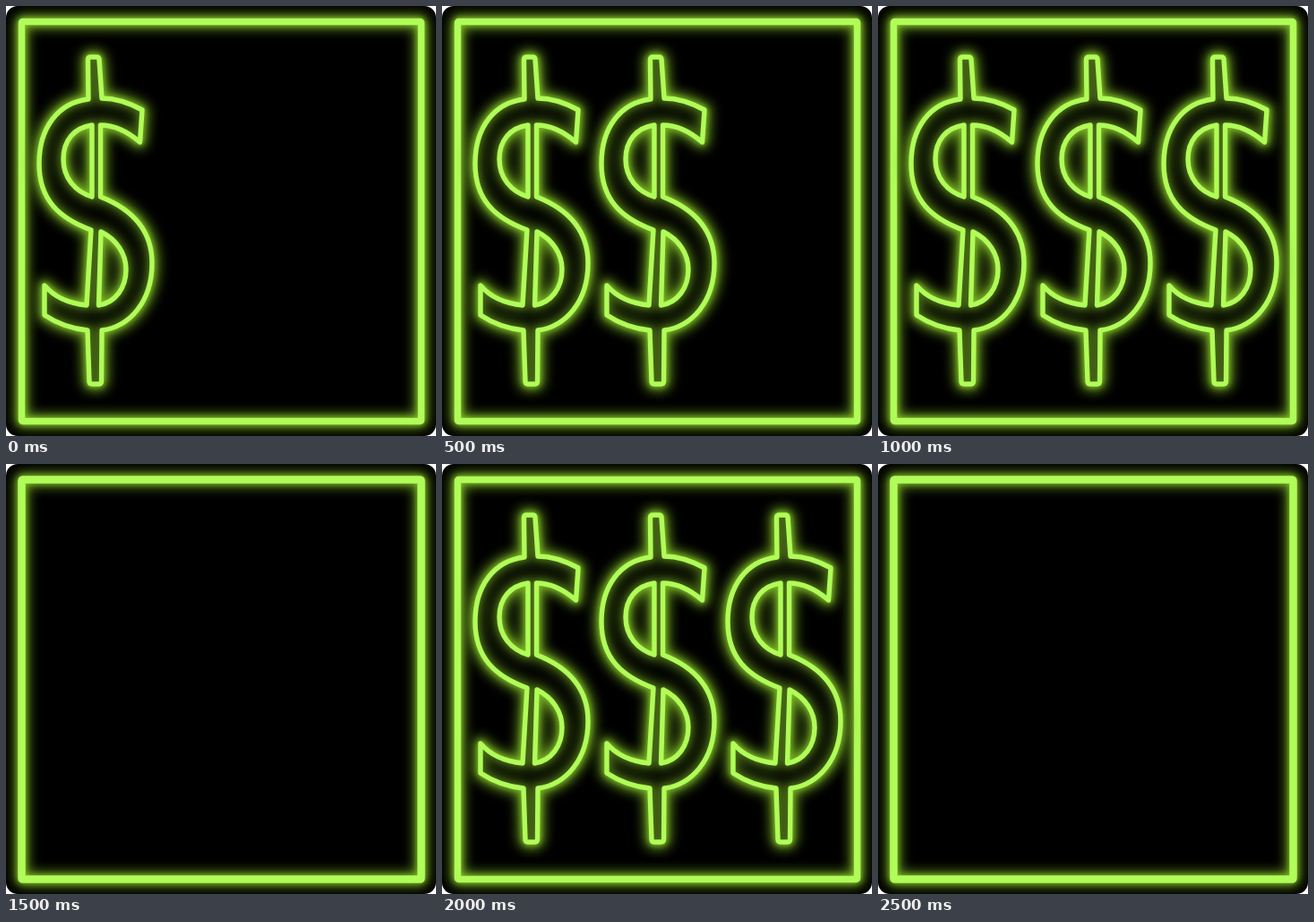
An HTML page for the animation above (3 s loop, 480 px wide and 480 px high).

```html
<!DOCTYPE html>
<html lang="en">
<head>
<meta charset="utf-8">
<title>Neon dollars</title>
<style>
  html, body { margin: 0; width: 100%; height: 100%; overflow: hidden; background: #fff; }
  svg { display: block; width: 100vw; height: 100vh; }
  .neon { fill: none; stroke-linejoin: round; stroke-linecap: round; }
  .halo { stroke: #64961c; filter: url(#wide); }
  .glow { stroke: #86c02c; filter: url(#tight); }
  .tube { stroke: #b0fc58; }
  .shade { fill: #000; fill-opacity: .4; fill-rule: evenodd; }
</style>
</head>
<body>
<svg viewBox="0 0 480 480">
  <defs>
    <filter id="wide" filterUnits="userSpaceOnUse" x="-40" y="-40" width="560" height="560" color-interpolation-filters="sRGB">
      <feGaussianBlur stdDeviation="6.5"/>
    </filter>
    <filter id="tight" filterUnits="userSpaceOnUse" x="-40" y="-40" width="560" height="560" color-interpolation-filters="sRGB">
      <feGaussianBlur stdDeviation="3"/>
    </filter>
    <clipPath id="card"><rect width="480" height="480" rx="13"/></clipPath>

    <rect id="frame" x="17.5" y="17.5" width="446" height="446" rx="1"/>

    <path id="dollar" d="M94.5 57 H101 Q104 57 104 60 L107 103
      C124 103 139 109 152 116 L149.5 152
      C138 142 122 133 105.5 133 L105.5 213
      C141 227 163 250 163 287 C163 330 138 358 107 362
      L106.5 419 Q106.5 422 103.5 422 H96 Q93 422 93 419 L91 362
      C72 360 55 353 43 345 L43 312
      C54 325 70 332 90 334 L95 250
      C60 237 37 217 37 176 C37 136 58 108 92 104
      L91.5 60 Q91.5 57 94.5 57 Z
      M96 133 C76 136 64 150 64 171 C64 192 77 207 96 213 Z
      M106 252 C124 261 134 277 134 294 C134 315 122 331 103.5 334 Z"/>
  </defs>

  <g clip-path="url(#card)">
    <rect width="480" height="480"/>
    <g class="neon">
      <use class="halo" href="#frame" stroke-width="15"/>
      <use class="glow" href="#frame" stroke-width="8"/>
      <use id="border" class="tube" href="#frame"/>
    </g>
    <g id="signs"></g>
  </g>
</svg>
<script>
  const STEP = 500, SPACING = 141;
  const counts = [1, 2, 3, 0, 3, 0];
  const signs = document.getElementById("signs");
  const border = document.getElementById("border");

  signs.innerHTML = [0, 1, 2].map(i => `
    <g class="neon" transform="translate(${i * SPACING})">
      <use class="halo" href="#dollar" stroke-width="15"/>
      <use class="glow" href="#dollar" stroke-width="6"/>
      <use class="tube shade" href="#dollar" stroke-width="5.4"/>
    </g>`).join("");

  function draw() {
    const count = counts[Math.floor(performance.now() / STEP) % counts.length];
    [...signs.children].forEach((sign, i) => {
      sign.style.display = i < count ? "" : "none";
    });
    border.setAttribute("stroke-width", count ? 7.5 : 8.5);
    requestAnimationFrame(draw);
  }
  draw();
</script>
</body>
</html>
```
